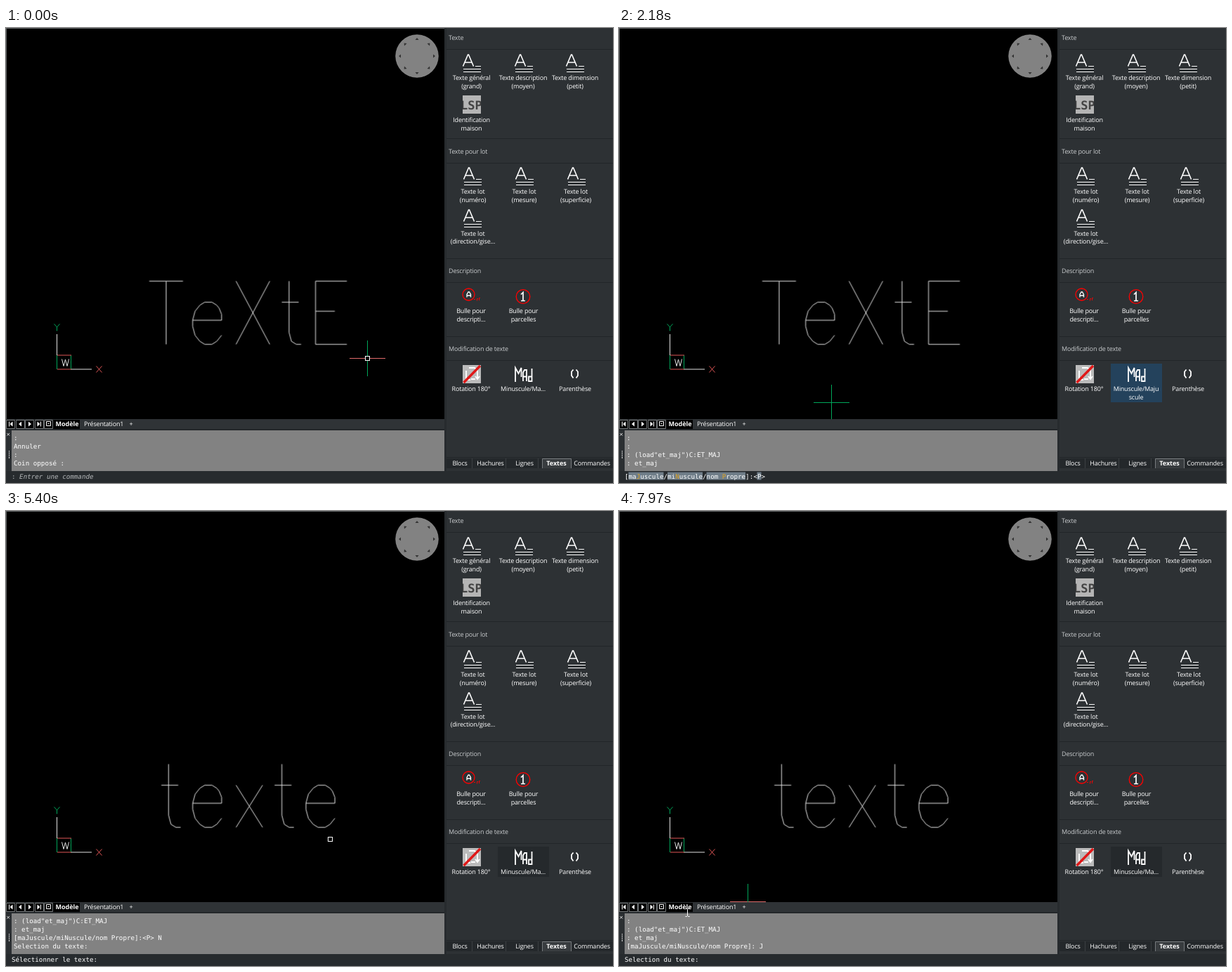
Recreate the animation shown at these times as an HTML page. Size 864 by 648 pixels, loop 8 s.

```html
<!DOCTYPE html>
<html lang="fr">
<head>
<meta charset="utf-8">
<title>Minuscule / Majuscule</title>
<style>
html, body { margin: 0; width: 100%; height: 100%; overflow: hidden; background: #000; }
#stage { position: relative; width: 864px; height: 648px; overflow: hidden; }
#stage > svg { position: absolute; left: 0; top: 0; }
text { text-rendering: geometricPrecision; white-space: pre; }
.ui { font: 9px "Open Sans", "Noto Sans", sans-serif; letter-spacing: -.18px; fill: #fff; }
.mid { text-anchor: middle; }
.head { fill: #c8cbcd; }
.bold { font-weight: 700; letter-spacing: 0; }
.cmd { font: 9.23px "DejaVu Sans Mono", "Liberation Mono", monospace; fill: #fff; }
.ln { fill: none; stroke: #fff; stroke-width: 1; }
.cad { fill: none; stroke: #e2e2e2; }
.cad path, #e, #t { vector-effect: non-scaling-stroke; }
.key { fill: #e0a526; }

/* states: hard switches */
.s { opacity: 0; }
.s, #h, #v, #box { animation: 8s step-end infinite; }
.hist0 { animation-name: hist0; }
.hist1 { animation-name: hist1; }
.hist2 { animation-name: hist2; }
.hist3 { animation-name: hist3; }
.hist4 { animation-name: hist4; }
.dflt { animation-name: dflt; }
.ask { animation-name: ask; }
.hover { animation-name: hover; }
.wide { animation-name: wide; }
.short { animation-name: short; }
.used { animation-name: used; }
.mixed { animation-name: mixed; }
.lower { animation-name: lower; }
.arrow { animation-name: arrow; }
.beam { animation-name: beam; }
.ring { animation-name: ring; }
@keyframes hist0 { 0% { opacity: 1 } 21.25% { opacity: 0 } }
@keyframes hist1 { 21.25% { opacity: 1 } 46.2% { opacity: 0 } 81.5% { opacity: 1 } 95.8% { opacity: 0 } }
@keyframes hist2 { 46.2% { opacity: 1 } 59.9% { opacity: 0 } }
@keyframes hist3 { 59.9% { opacity: 1 } 81.5% { opacity: 0 } }
@keyframes hist4 { 95.8% { opacity: 1 } 100% { opacity: 1 } }
@keyframes dflt { 21.25% { opacity: 1 } 46.2% { opacity: 0 } }
@keyframes ask { 46.2% { opacity: 1 } 59.9% { opacity: 0 } 95.8% { opacity: 1 } }
@keyframes hover { 13.9% { opacity: 1 } 19% { opacity: 0 } }
@keyframes wide { 19% { opacity: 1 } 28.75% { opacity: 0 } }
@keyframes short { 0% { opacity: 1 } 19% { opacity: 0 } 28.75% { opacity: 1 } }
@keyframes used { 28.75% { opacity: 1 } 100% { opacity: 1 } }
@keyframes mixed { 0% { opacity: 1 } 59.85% { opacity: 0 } }
@keyframes lower { 59.85% { opacity: 1 } 100% { opacity: 1 } }

/* crosshair */
#view { position: absolute; left: 0; top: 0; width: 624px; height: 557px; overflow: hidden; }
#cross, #mouse { position: absolute; width: 0; height: 0; }
#cross { animation: cross 8s linear infinite; }
#cross div { position: absolute; box-sizing: border-box; }
#h { left: -25px; top: 0; width: 51px; height: 1px; background: #e06a6a; animation-name: lineH; }
#v { left: 0; top: -25px; width: 1px; height: 51px; background: #00a65a; animation-name: lineV; }
#box { left: -3px; top: -3px; width: 7px; height: 7px; border: 1px solid #fff; background: #000; animation-name: pick; }
@keyframes lineH {
  0% { opacity: 1 } 23.75% { background: #00a65a } 27.9% { background: #e06a6a }
  51.4% { opacity: 0 } 81.5% { opacity: 1 }
}
@keyframes lineV { 0% { opacity: 1 } 51.4% { opacity: 0 } 81.5% { opacity: 1 } }
@keyframes pick { 0% { opacity: 1 } 21.25% { opacity: 0 } 51.4% { opacity: 1 } 81.5%, 100% { opacity: 0 } }
@keyframes cross {
  0%, .37% { left: 514px; top: 470px }
  1.375% { left: 556px; top: 480px }
  8.7% { left: 556px; top: 480px; animation-timing-function: ease-in }
  11.9% { left: 623px; top: 504px }
  22.25% { left: 623px; top: 504px; animation-timing-function: ease-out }
  27.2%, 27.8% { left: 302px; top: 533px }
  29.75%, 51.39% { left: 245px; top: 556px }
  51.4% { left: 228px; top: 556px; animation-timing-function: ease-out }
  58% { left: 352px; top: 412px }
  64% { left: 352px; top: 412px }
  64.8% { left: 347px; top: 422px }
  67.5% { left: 460px; top: 467px }
  69.3% { left: 607px; top: 537px; animation-timing-function: ease-in-out }
  73.5%, 74.2% { left: 536px; top: 474px }
  78.75% { left: 470px; top: 497px }
  82.5% { left: 400px; top: 500px }
  84%, 84.2% { left: 326px; top: 508px }
  84.3% { left: 301px; top: 514px }
  86%, 100% { left: 183px; top: 556px }
}

/* mouse pointer outside the drawing */
#mouse { animation: mouse 8s linear infinite; }
#mouse svg { position: absolute; left: -12px; top: -16px; overflow: visible; }
@keyframes arrow {
  11.9% { opacity: 1 } 22.25% { opacity: 0 } 29.75% { opacity: 1 } 30.7% { opacity: 0 }
  50.6% { opacity: 1 } 51.4% { opacity: 0 } 86% { opacity: 1 } 87% { opacity: 0 }
}
@keyframes beam { 30.7% { opacity: 1 } 50.6% { opacity: 0 } 87%, 100% { opacity: 1 } }
@keyframes ring { 17.7% { opacity: 1 } 19.5% { opacity: 0 } }
@keyframes mouse {
  0% { left: 623px; top: 504px }
  11.9% { left: 623px; top: 504px; animation-timing-function: ease-out }
  15.9% { left: 739px; top: 498px }
  19% { left: 739px; top: 498px; animation-timing-function: ease-in }
  22.25% { left: 623px; top: 508px }
  29.7% { left: 245px; top: 556px; animation-timing-function: ease-out }
  35.9%, 38.1% { left: 60px; top: 636px }
  43%, 48.7% { left: 94px; top: 637px }
  51% { left: 210px; top: 567px }
  51.4% { left: 228px; top: 556px }
  85.9% { left: 183px; top: 556px; animation-timing-function: ease-out }
  90.75%, 95.8% { left: 43px; top: 636px }
  99.6%, 100% { left: 97px; top: 571px }
}
</style>
</head>
<body>
<div id="stage">
<svg width="864" height="648">
  <defs>
    <g id="A" class="ln" stroke-width="1.5">
      <path d="M.5 18.500L7.500 2H8.500L15.500 18.500M3 13H13" style="stroke-width:1.6"/>
      <path d="M18 18.500H26M1 22.500H26M1 26.500H26" style="stroke-width:1.2"/>
    </g>
    <!-- letters on the grid of the stroke font, 21 units high -->
    <path id="e" d="M0 6H12V4L11 2L10 1L8 0H5L3 1L1 3L0 6V8L1 11L3 13L5 14H8L10 13L12 11"/>
    <path id="t" d="M3 0V17L4 20L6 21H8M0 7H7"/>
    <rect id="split" x="627" width="237" height="1" fill="#212528"/>
    <clipPath id="chip"><rect x="650" y="96" width="26" height="26"/></clipPath>
  </defs>

  <!-- drawing area -->
  <rect width="624" height="557"/>
  <path d="M0 .5H624M.5 0V557" stroke="#5c5f61"/>
  <circle cx="585" cy="40" r="30.300" fill="#828282" stroke="#999" stroke-width=".7"/>
  <g fill="#333">
    <path id="tick" d="M585 14L587.500 17H582.500Z"/>
    <use href="#tick" transform="rotate(45 585 40)"/>
    <use href="#tick" transform="rotate(90 585 40)"/>
    <use href="#tick" transform="rotate(135 585 40)"/>
    <use href="#tick" transform="rotate(180 585 40)"/>
    <use href="#tick" transform="rotate(225 585 40)"/>
    <use href="#tick" transform="rotate(270 585 40)"/>
    <use href="#tick" transform="rotate(315 585 40)"/>
  </g>
  <g class="cad">
    <path d="M72.500 436V466M92 486H122"/>
    <path d="M72.500 466V486M92.500 466V486M68.500 421.500L72.500 426L76.500 421.500M72.500 426V431.500" stroke="#00a65a"/>
    <path d="M73 466H93M73 486H93M128.500 481.500L136.500 490.500M136.500 481.500L128.500 490.500" stroke="#e05656"/>
    <path d="M79.500 471.500L82 481.500L84.500 472L87 481.500L89.500 471.500"/>
  </g>
  <g class="cad" transform="translate(200.500 360.500) scale(3.430 4.286)">
    <g class="s mixed">
      <path d="M1 0H15M8 0V21M37 0L51 21M51 0L37 21M83 0H70V21H83M70 10H78"/>
      <use href="#e" x="19" y="7"/>
      <use href="#t" x="56"/>
    </g>
    <g class="s lower">
      <path d="M37 7L48 21M48 7L37 21"/>
      <use href="#t" x="6"/><use href="#e" x="19" y="7"/>
      <use href="#t" x="53"/><use href="#e" x="66" y="7"/>
    </g>
  </g>

  <!-- layout tabs -->
  <rect y="557" width="624" height="16" fill="#2f3336"/>
  <rect y="571" width="624" height="2" fill="#23272a"/>
  <path d="M0 558H105V571H0Z"/>
  <path d="M.5 558.500H12.500V570.500H.5ZM14.500 558.500H26.500V570.500H14.500ZM27.500 558.500H39.500V570.500H27.500ZM41.500 558.500H53.500V570.500H41.500ZM54.500 558.500H66.500V570.500H54.500Z" fill="none" stroke="#74787a"/>
  <path d="M4.500 560.500V567.500M49.500 560.500V567.500" stroke="#fff"/>
  <path d="M9.500 560.500V567.500L5.500 564ZM22 560.500V567.500L18 564ZM32 560.500V567.500L36 564ZM44.500 560.500V567.500L48.500 564Z" fill="#fff"/>
  <path class="ln" d="M57.500 560.500H63.500V566.500H57.500ZM59.500 563.500H61.500"/>
  <g class="ui">
    <text class="bold" x="70.500" y="567">Modèle</text>
    <text x="111" y="567">Présentation1</text>
    <text x="175.500" y="567">+</text>
  </g>

  <!-- command window -->
  <rect y="573" width="8" height="58" fill="#2b2f32"/>
  <rect x="8" y="573" width="616" height="58" fill="#828282"/>
  <rect y="631" width="864" height="17" fill="#272b2e"/>
  <path d="M1.500 577L5 580.500M5 577L1.500 580.500M4.500 602V613" stroke="#ddd"/>
  <path d="M4 604H5.500M4 607H5.500M4 610H5.500" stroke="#2b2f32"/>
  <g class="cmd">
    <g class="s hist0">
      <text x="11" y="587">:</text>
      <text x="11" y="599">Annuler</text>
      <text x="11" y="611">:</text>
      <text x="11" y="623">Coin opposé :</text>
      <text x="8" y="641.500" fill="#b4b7b9">: <tspan font-style="italic">Entrer une commande</tspan></text>
    </g>
    <g class="s hist1">
      <text x="11" y="587">:</text>
      <text x="11" y="599">:</text>
      <text x="11" y="611">: (load"et_maj")C:ET_MAJ</text>
      <text x="11" y="623">: et_maj</text>
      <path d="M13.500 632.500h50v11h-50zM69 632.500h50v11h-50zM124.500 632.500h55.500v11h-55.500z" fill="#6f7d88"/>
      <text x="8" y="641.500">[ma<tspan class="key">J</tspan>uscule/mi<tspan class="key">N</tspan>uscule/nom <tspan class="key">P</tspan>ropre]:</text>
    </g>
    <g class="s dflt">
      <rect x="196.500" y="632.500" width="6" height="11" fill="#6f7d88"/>
      <text x="191.400" y="641.500">&lt;P&gt;</text>
    </g>
    <g class="s ask">
      <text x="11" y="587">:</text>
      <text x="11" y="599">: (load"et_maj")C:ET_MAJ</text>
      <text x="11" y="611">: et_maj</text>
      <text x="8" y="641.500">Selection du texte:</text>
    </g>
    <text class="s hist2" x="11" y="623">[maJuscule/miNuscule/nom Propre]:&lt;P&gt; N</text>
    <text class="s hist4" x="11" y="623">[maJuscule/miNuscule/nom Propre]: J</text>
    <g class="s hist3">
      <text x="11" y="587">: (load"et_maj")C:ET_MAJ</text>
      <text x="11" y="599">: et_maj</text>
      <text x="11" y="611">[maJuscule/miNuscule/nom Propre]:&lt;P&gt; N</text>
      <text x="11" y="623">Selection du texte:</text>
      <text x="8" y="641.500">Sélectionner le texte:</text>
    </g>
  </g>

  <!-- tool panel -->
  <rect x="624" width="240" height="631" fill="#2d3134"/>
  <rect x="624" width="3" height="631" fill="#272b2e"/>
  <use href="#split" y="30"/><use href="#split" y="157"/><use href="#split" y="192"/>
  <use href="#split" y="328"/><use href="#split" y="362"/><use href="#split" y="439"/>
  <use href="#split" y="473"/><use href="#split" y="611"/>
  <g class="ui">
    <text class="head" x="630" y="17">Texte</text>
    <text class="head" x="630" y="179">Texte pour lot</text>
    <text class="head" x="630" y="349">Description</text>
    <text class="head" x="630" y="460">Modification de texte</text>
  </g>
  <use href="#A" x="650" y="36"/><use href="#A" x="724" y="36"/><use href="#A" x="797" y="36"/>
  <use href="#A" x="651" y="197"/><use href="#A" x="725" y="197"/><use href="#A" x="799" y="197"/>
  <use href="#A" x="651" y="257"/>
  <g clip-path="url(#chip)">
    <rect x="650" y="96" width="26" height="26" fill="#b5b5b5"/>
    <text x="647" y="115.500" font-family="DejaVu Sans Mono, monospace" font-weight="700" font-size="17" fill="#444">LSP</text>
  </g>

  <g fill="none" stroke="#f00" stroke-width="1.300">
    <circle cx="658.500" cy="379.500" r="8.500"/>
    <path d="M666 386.500H668M670.500 388.500V385.500H672M673.500 388V384.500H675" stroke-width=".9"/>
    <circle cx="736" cy="382.500" r="9.800"/>
    <path d="M656 383.500V379.500L658 376H659.500L661.500 379.500V383.500M656 381H661.500" stroke="#fff"/>
    <path d="M733 379.500L736 376.500V388M733 388.500H739" stroke="#fff" stroke-width="1.700"/>
  </g>

  <rect class="s hover" x="700.500" y="478.500" width="72" height="43" fill="#24425c" stroke="#2f5674"/>
  <rect class="s wide" x="700" y="478" width="73" height="55" fill="#24425c"/>
  <rect class="s used" x="700" y="478" width="73" height="43" fill="#25292c"/>

  <rect x="650" y="480" width="26" height="26" fill="#bbb"/>
  <g class="ln" style="stroke-width:1.8">
    <path d="M655 488V501H661M659 484H667L671 488V499M668 496L671 500L674 496M662 500H668"/>
    <path d="M651.500 505L675 481" stroke="#e01818" style="stroke-width:3.4"/>
    <path d="M725 504V484L729.500 492L733.500 484V497M736 503V490.500L738 487H741V503M736 496.500H741M748.500 485V503H744V496.500H748.500"/>
    <path d="M807.500 486.500L805 489.500V495L807.500 498.500M811.500 486.500L814 489.500V495L811.500 498.500"/>
  </g>

  <g class="ui mid">
    <text x="662.500" y="74">Texte général</text><text x="662.500" y="86">(grand)</text>
    <text x="736" y="74">Texte description</text><text x="736" y="86">(moyen)</text>
    <text x="810" y="74">Texte dimension</text><text x="810" y="86">(petit)</text>
    <text x="662.500" y="133.500">Identification</text><text x="662.500" y="145.500">maison</text>
    <text x="664.500" y="235.500">Texte lot</text><text x="664.500" y="247.500">(numéro)</text>
    <text x="737.500" y="235.500">Texte lot</text><text x="737.500" y="247.500">(mesure)</text>
    <text x="811" y="235.500">Texte lot</text><text x="811" y="247.500">(superficie)</text>
    <text x="664.500" y="295.500">Texte lot</text><text x="664.500" y="307">(direction/gise...</text>
    <text x="662" y="406">Bulle pour</text><text x="662" y="418">descripti...</text>
    <text x="736.500" y="406">Bulle pour</text><text x="736.500" y="418">parcelles</text>
    <text x="662" y="517">Rotation 180°</text>
    <text class="s short" x="736" y="517">Minuscule/Ma...</text>
    <g class="s wide"><text x="736" y="517">Minuscule/Maju</text><text x="736" y="529">scule</text></g>
    <text x="810" y="517">Parenthèse</text>
  </g>

  <rect x="627" y="613" width="237" height="14" fill="#24282b"/>
  <path d="M663.500 613V627M711.500 613V627M757.500 613V627" stroke="#3b3f42"/>
  <path d="M763.500 627V613.500H804.500V627" fill="#383c3f" stroke="#777b7e"/>
  <g class="ui mid">
    <text x="646" y="623">Blocs</text>
    <text x="689.500" y="623">Hachures</text>
    <text x="738" y="623">Lignes</text>
    <text class="bold" x="783.500" y="623">Textes</text>
    <text x="834" y="623">Commandes</text>
  </g>
</svg>

<div id="view"><div id="cross"><div id="h"></div><div id="v"></div><div id="box"></div></div></div>

<div id="mouse"><svg width="30" height="36" viewBox="-12 -16 30 36">
  <circle class="s ring" cy="-1" r="6" fill="none" stroke="#d5dde3"/>
  <path class="s arrow" d="M0 0V11.500L2.600 9L4.400 13L6.300 12.200L4.600 8.400H8Z" fill="#fff" stroke="#000" stroke-width=".6"/>
  <path class="s beam ln" d="M-2.500 -4.500H-.5L.5 -3.500L1.500 -4.500H3.500M.5 -3.500V5.500M-2.500 6.500H-.5L.5 5.500L1.500 6.500H3.500"/>
</svg></div>
</div>
</body>
</html>
```
